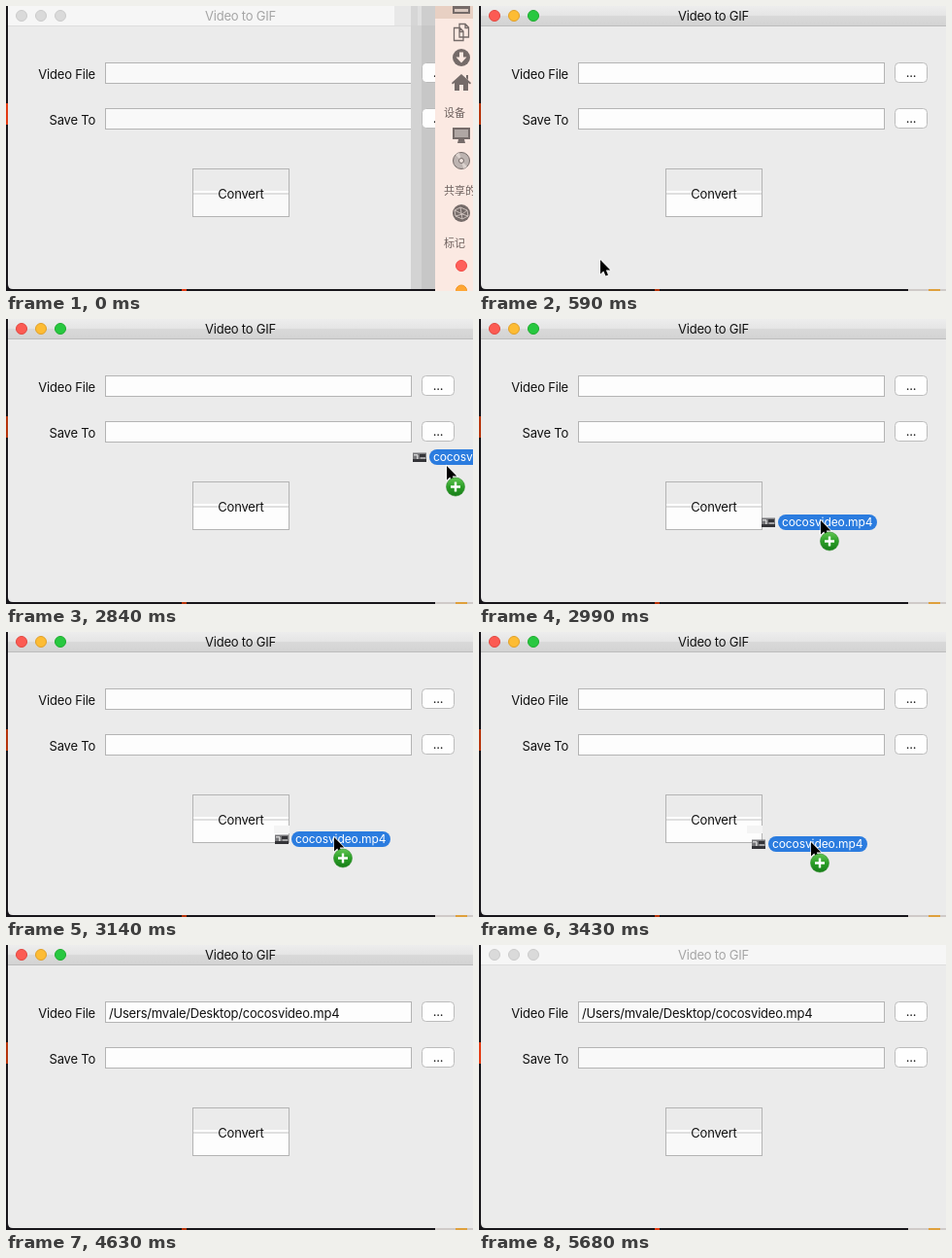
Recreate the animation shown at these times as an HTML page. Size 481 by 293 pixels, loop 5780 ms.

```html
<!DOCTYPE html>
<html lang="en">
<head>
<meta charset="utf-8">
<title>Video to GIF</title>
<style>
html, body { margin: 0; width: 100%; height: 100%; overflow: hidden; background: #17151a; }
svg { display: block; width: 481px; height: 293px; }
text { font: 13px Inter, "Open Sans", sans-serif; letter-spacing: -.2px; fill: #111; }
.side text { font: 500 11px "Noto Sans CJK SC", "Noto Sans CJK", sans-serif; letter-spacing: 0; fill: #6f625f; }
.mid { text-anchor: middle; }
.end { text-anchor: end; }
.field { fill: #fdfdfd; stroke: #b4b4b4; }
.idle .field { fill: #f9f9f9; }
.idle .title { fill: #a5a5a5; }
.idle .lights circle { fill: #dadada; stroke: #cbcbcb; }
.idle .bar { fill: #f6f6f6; }
.idle .red { fill: #e23a12; }
.red { fill: #b5330a; }
</style>
</head>
<body>
<svg id="stage" viewBox="0 0 481 293">
  <defs>
    <linearGradient id="barFill" x2="0" y2="1">
      <stop offset="0" stop-color="#ededed"/><stop offset=".48" stop-color="#e5e5e5"/>
      <stop offset=".52" stop-color="#d9d9d9"/><stop offset="1" stop-color="#d3d3d3"/>
    </linearGradient>
    <linearGradient id="green" x2="0" y2="1">
      <stop offset="0" stop-color="#62c653"/><stop offset=".5" stop-color="#2c9f27"/>
      <stop offset="1" stop-color="#167d18"/>
    </linearGradient>
    <g id="more">
      <rect x="428.5" y=".5" width="33" height="20" rx="4" fill="#fefefe" stroke="#bcbcbc"/>
      <text class="mid" x="445" y="15">...</text>
    </g>
  </defs>

  <rect width="481" height="293" fill="#17151a"/>
  <path class="red" d="M0 100h2v22h-2zM181 291h5v2h-5z"/>
  <path fill="#cfcac8" d="M442 290h39v3h-39z"/>
  <path fill="#dfa03c" d="M463 290h12v3h-12z"/>

  <path fill="#ebebeb" d="M2 0H481V291H7q-5 0-5-5z"/>
  <rect class="bar" x="2" width="479" height="20" fill="url(#barFill)"/>
  <path id="rule" stroke="#bdbdbd" d="M2 20.5H481"/>
  <g class="lights">
    <circle cx="16" cy="10" r="5.5" fill="#fc5b53" stroke="#e2463f"/>
    <circle cx="36" cy="10" r="5.5" fill="#fdbc34" stroke="#e0a02a"/>
    <circle cx="56" cy="10" r="5.5" fill="#28c840" stroke="#1dac2e"/>
  </g>
  <text class="mid title" x="241.5" y="15">Video to GIF</text>

  <text class="end" x="92" y="75">Video File</text>
  <text class="end" x="92" y="122">Save To</text>
  <rect class="field" x="102.5" y="58.5" width="315" height="21"/>
  <rect class="field" x="102.5" y="105.5" width="315" height="21"/>
  <text id="path" x="106" y="75">/Users/mvale/Desktop/cocosvideo.mp4</text>

  <rect class="field" x="192.5" y="167.5" width="99" height="49"/>
  <path fill="#ebebeb" d="M193 168h98v22h-98z"/>
  <path fill="#fff" d="M193 190h98v2h-98z"/>
  <path fill="#dfdfdf" d="M193 192h98v2h-98z"/>
  <text class="mid" x="242" y="198">Convert</text>

  <g id="side" class="side">
    <path fill="#d3d3d3" d="M417 20h11v271h-11z"/>
    <path fill="#c7c7c7" d="M428 20h14v271h-14z"/>
    <path fill="#e8e8e8" d="M400 0h17v20h-17z"/>
    <path fill="#d6d6d6" d="M417 0h7v20h-7z"/>
    <path fill="#e0e0e0" d="M424 0h4v20h-4z"/>
    <path fill="#cecece" d="M428 0h14v20h-14z"/>
  </g>
  <use href="#more" y="58"/>
  <use href="#more" y="105"/>

  <g id="panel" class="side">
    <path fill="#fbe9e2" d="M442 0h39v293h-39z"/>
    <path fill="#e8d0c3" d="M442 0h39v13h-39z"/>
    <g fill="#756b69">
      <path d="M460 0h18v8h-18z"/>
      <circle cx="469" cy="53" r="9"/>
      <path d="M469 70l10 9-1 1.500-2-1.500v8h-5v-6h-4v6h-5v-8l-2 1.500-1-1.500zM474 71h2v5l-2-2z"/>
      <path d="M460 125h18v12h-18zM466 137h6l1 4h-8z"/>
      <circle cx="469" cy="213" r="9"/>
    </g>
    <path fill="#d9c8c0" d="M462 3h14v3h-14z"/>
    <g fill="#fbe9e2" stroke="#756b69" stroke-width="1.300">
      <path d="M467 18.500h6l3.500 3.500v10h-9.500zM473 18.500v4h3.500M461.500 22.500h6l3.500 3.500v9.500h-9.500zM467.500 22.500v4h3.500"/>
    </g>
    <path fill="#fbe9e2" d="M467 47.500h4v5h3.500l-5.500 6-5.500-6h3.500z"/>
    <path fill="#b0a7a4" d="M462 127h14v8h-14z"/>
    <circle cx="469" cy="159" r="8.500" fill="#bdb4b1" stroke="#756b69"/>
    <path fill="#dcd3cf" d="M469 159l-6-6a8 8 0 0 1 4-2zM469 159l6 6a8 8 0 0 1-4 2z"/>
    <circle cx="469" cy="159" r="2.500" fill="#eee3de" stroke="#756b69"/>
    <path fill="none" stroke="#d5c9c4" stroke-width=".9" d="M462 210l6-3 7 3 1 6-6 3-7-3zM468 207l2 12M462 210l8 4 5-4M463 216l7-2 6 2"/>
    <text x="451" y="114">设备</text>
    <text x="451" y="194">共享的</text>
    <text x="451" y="248">标记</text>
    <circle cx="469" cy="267" r="5.500" fill="#ff605b" stroke="#f24842"/>
    <circle cx="469" cy="292.500" r="5.500" fill="#ffa634" stroke="#f19522"/>
  </g>

  <path id="patch" fill="#f4f4f4" d="M276 199h16v8h-16z"/>
  <g id="file">
    <path fill="#77777a" d="M-17 3.500h14v9.500h-14z"/>
    <path fill="#343438" d="M-17 10h14v3h-14zM-10 5h6v3h-6z"/>
    <path fill="#d0d0d0" d="M-16 5h4v1.500h-4zM-13 6h1.500v4h-1.500zM-9 8.500h5v1h-5z"/>
    <rect width="102" height="16" rx="8" fill="#2b7cdf"/>
    <text x="4" y="12.300" style="font-size:12px;letter-spacing:-.1px;fill:#fff">cocosvideo.mp4</text>
  </g>
  <g id="cursor">
    <path d="M1 1V15.500L4.300 12.500 6.500 17.500 9 16.500 6.800 11.500H11.300Z" stroke="#fff" stroke-width="1.200" paint-order="stroke"/>
    <g id="badge">
      <circle cx="10" cy="22.500" r="9.500" fill="url(#green)" stroke="#2d8a29" stroke-width=".6"/>
      <path stroke="#fff" stroke-width="2.400" d="M5 22.500h10M10 17.500v10"/>
    </g>
  </g>
</svg>
<script>
const LOOP = 5780;
// time, cursor x, cursor y, dragged label x, label y
const steps = [
  [0], [300, 173, 224], [450, 124, 260], [740, 195, 240], [890, 441, 239], [1040],
  [2840, 453, 150, 436, 134], [2990, 351, 206, 308, 201],
  [3140, 337, 210, 294, 205], [3290, 338, 211, 295, 206], [3430, 341, 215, 298, 210],
  [3880, 341, 215], [4330, 421, 245], [4480, 440, 277], [4630]
];
const el = id => document.getElementById(id);
const show = (id, on) => { el(id).style.display = on ? "" : "none"; };
function place(id, x, y) {
  show(id, x !== undefined);
  if (x !== undefined) el(id).setAttribute("transform", `translate(${x} ${y})`);
}

function draw(now) {
  const t = now % LOOP;
  const [, x, y, fileX, fileY] = steps.findLast(s => s[0] <= t);
  const opening = t < 590;
  const idle = opening || t >= 5680;
  el("stage").classList.toggle("idle", idle);
  el("rule").setAttribute("stroke", idle ? "#dedede" : "#bdbdbd");
  show("side", opening);
  show("panel", opening);
  show("path", t >= 3880);
  show("patch", t >= 3140 && t < 3880);
  place("cursor", x, y);
  place("file", fileX, fileY);
  show("badge", fileX !== undefined);
  requestAnimationFrame(draw);
}
draw(performance.now());
</script>
</body>
</html>
```
